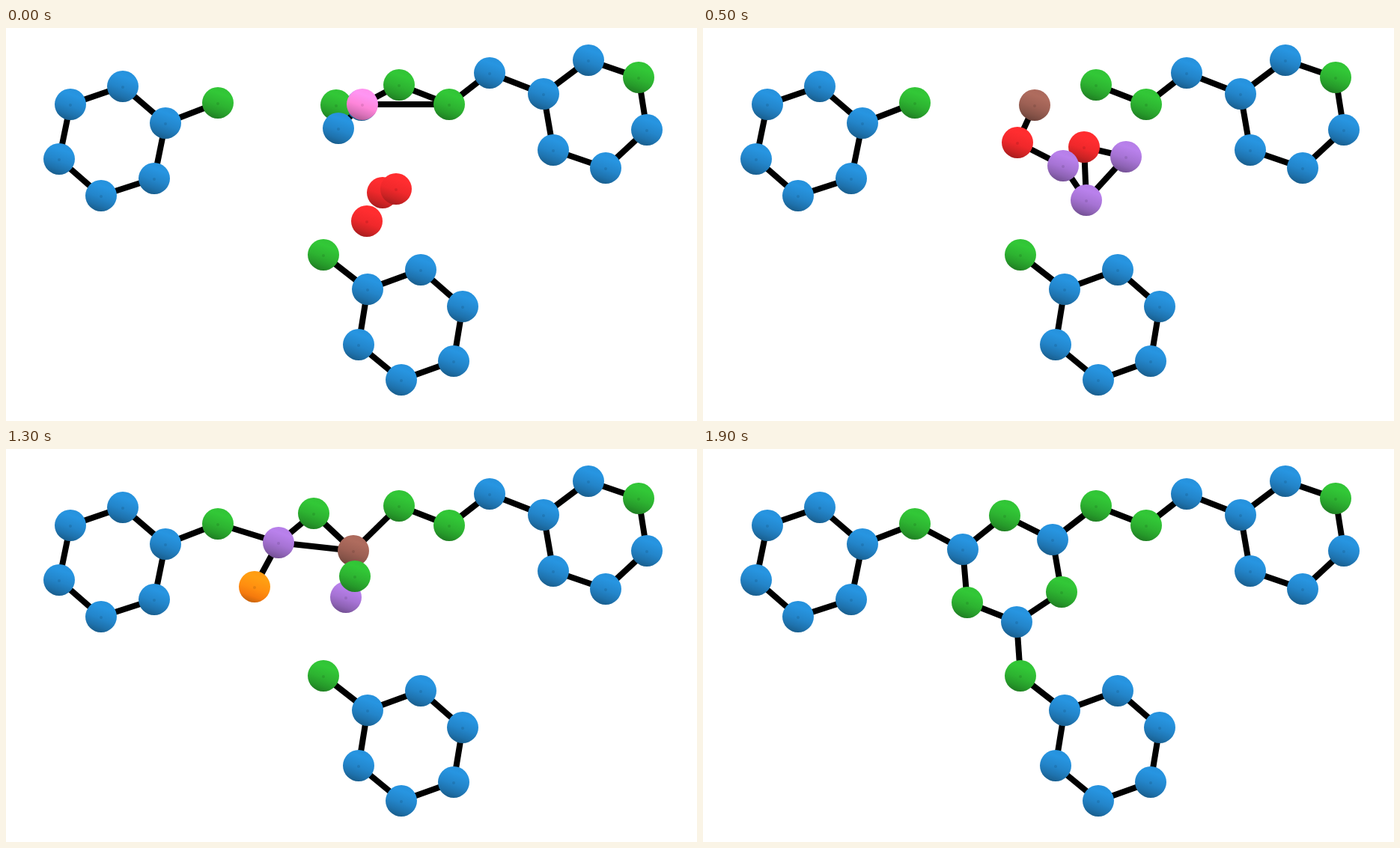
An HTML page with a canvas that plays this animation: 923 by 525 pixels, repeating every 2.7 s.

```html
<!DOCTYPE html>
<html lang="en">
<head>
<meta charset="utf-8">
<title>Molecule assembly</title>
<style>
html, body { margin: 0; width: 100%; height: 100%; overflow: hidden; background: #fff; }
canvas { display: block; }
</style>
</head>
<body>
<canvas id="stage" width="923" height="525"></canvas>
<script>
const ctx = document.getElementById('stage').getContext('2d');
const LOOP = 2700, STEP = 100, LAST = 1900, RADIUS = 21;

const colours = {
  blue: [31, 119, 180],
  green: [40, 160, 44],
  red: [214, 36, 38],
  pink: [227, 119, 194],
  purple: [148, 103, 189],
  brown: [140, 86, 75],
  orange: [255, 127, 14]
};
// Brightness down the sphere, from the lit side to the shaded one.
const light = [[0, 1.22], [0.2, 1.25], [0.55, 1.12], [0.8, 0.96], [1, 0.78]];

// Fixed fragments: chains of points, each joined to the one before.
const fixed = [
  { points: [[283, 100], [213, 127], [156, 78], [86, 102], [71, 175], [127, 224], [198, 201]], green: [0] },
  { points: [[424, 303], [483, 349], [554, 323], [610, 372], [598, 445], [528, 470], [471, 423]], green: [0] },
  { points: [[525, 76], [592, 102], [646, 60], [718, 88], [778, 43], [845, 66], [856, 136], [801, 187], [731, 163]], green: [0, 1, 5] }
];
const anchors = { L: [283, 100], B: [424, 303], R: [554, 323], T: [525, 76], U: [592, 102] };

// Moving atoms are a, b, c ... from front to back; bonds name their two ends.
const pose = (time, bonds, ...atoms) => ({ time, bonds: bonds.split(' '), atoms });
const ring = 'Le ef fd dT db bc ca ae cB';
const poses = [
  pose(0, 'dT dU ed', [521, 215, 'red'], [503, 220, 'red'], [482, 258, 'red'],
    [476, 102, 'pink'], [444, 134, 'blue'], [441, 103, 'green'], [475, 103, 'blue']),
  pose(200, 'aR bR dT dU ef', [574, 264, 'purple'], [559, 252, 'red'], [481, 244, 'orange'],
    [526, 151, 'brown'], [419, 172, 'red'], [437, 83, 'brown'], [480, 245, 'red']),
  pose(500, 'fe ea ac dc db bc', [481, 184, 'purple'], [565, 172, 'purple'], [512, 230, 'purple'],
    [509, 159, 'red'], [420, 153, 'red'], [443, 103, 'brown']),
  pose(800, 'ea ab fb ac cB', [406, 168, 'brown'], [482, 151, 'blue'], [439, 228, 'green'],
    [503, 158, 'orange'], [373, 138, 'purple'], [454, 103, 'red']),
  pose(1300, 'Le ef ed fd dT ea', [332, 184, 'orange'], [466, 170, 'green'], [454, 198, 'purple'],
    [464, 136, 'brown'], [364, 125, 'purple'], [411, 86, 'green']),
  pose(1500, 'Le ef fd dT ea ec ac dc db bc cB', [348, 215, 'orange'], [461, 189, 'orange'], [420, 217, 'purple'],
    [474, 123, 'purple'], [342, 127, 'pink'], [394, 96, 'green']),
  pose(1800, ring, [320, 203, 'green'], [490, 190, 'green'], [419, 229, 'blue'],
    [469, 121, 'blue'], [346, 133, 'blue'], [403, 86, 'green']),
  pose(LAST, ring, [353, 205, 'green'], [479, 191, 'green'], [419, 231, 'blue'],
    [467, 121, 'blue'], [347, 134, 'blue'], [403, 89, 'green'])
];

function bond([x1, y1], [x2, y2]) {
  ctx.beginPath();
  ctx.moveTo(x1, y1);
  ctx.lineTo(x2, y2);
  ctx.stroke();
}

function disc(x, y, radius, fill) {
  ctx.fillStyle = fill;
  ctx.beginPath();
  ctx.arc(x, y, radius, 0, Math.PI * 2);
  ctx.fill();
}

function atom([x, y, kind]) {
  const shade = ctx.createLinearGradient(x + 7, y - 20, x - 7, y + 20);
  for (const [stop, level] of light) {
    shade.addColorStop(stop, `rgb(${colours[kind].map(c => Math.min(255, Math.round(c * level)))})`);
  }
  disc(x, y, RADIUS, shade);
  disc(x, y + 1, 2, 'rgba(0, 0, 0, 0.1)');
}

// Between two poses atoms glide; kinds and bonds switch halfway.
function poseAt(time) {
  const next = poses.find(p => p.time >= time);
  const prev = poses[Math.max(0, poses.indexOf(next) - 1)];
  const mix = next === prev ? 0 : (time - prev.time) / (next.time - prev.time);
  const near = mix < 0.5 ? prev : next;
  const atoms = near.atoms.map(([, , kind], i) => {
    const from = prev.atoms[i] || near.atoms[i], to = next.atoms[i] || near.atoms[i];
    return [from[0] + (to[0] - from[0]) * mix, from[1] + (to[1] - from[1]) * mix, kind];
  });
  return { atoms, bonds: near.bonds };
}

function draw(time) {
  const { atoms, bonds } = poseAt(time);
  const end = name => anchors[name] || atoms['abcdefg'.indexOf(name)];
  ctx.fillStyle = '#fff';
  ctx.fillRect(0, 0, 923, 525);
  ctx.strokeStyle = '#000';
  ctx.lineWidth = 8;
  for (const { points } of fixed) {
    const ringStart = points.length - 6;
    points.forEach((p, i) => bond(p, points[i + 1] || points[ringStart]));
  }
  for (const [from, to] of bonds) bond(end(from), end(to));
  for (const { points, green } of fixed) {
    points.forEach(([x, y], i) => atom([x, y, green.includes(i) ? 'green' : 'blue']));
  }
  atoms.reverse().forEach(atom);
}

const start = performance.now();
function tick() {
  const time = (performance.now() - start) % LOOP;
  draw(Math.min(LAST, Math.floor(time / STEP) * STEP));
  requestAnimationFrame(tick);
}
tick();
</script>
</body>
</html>
```
